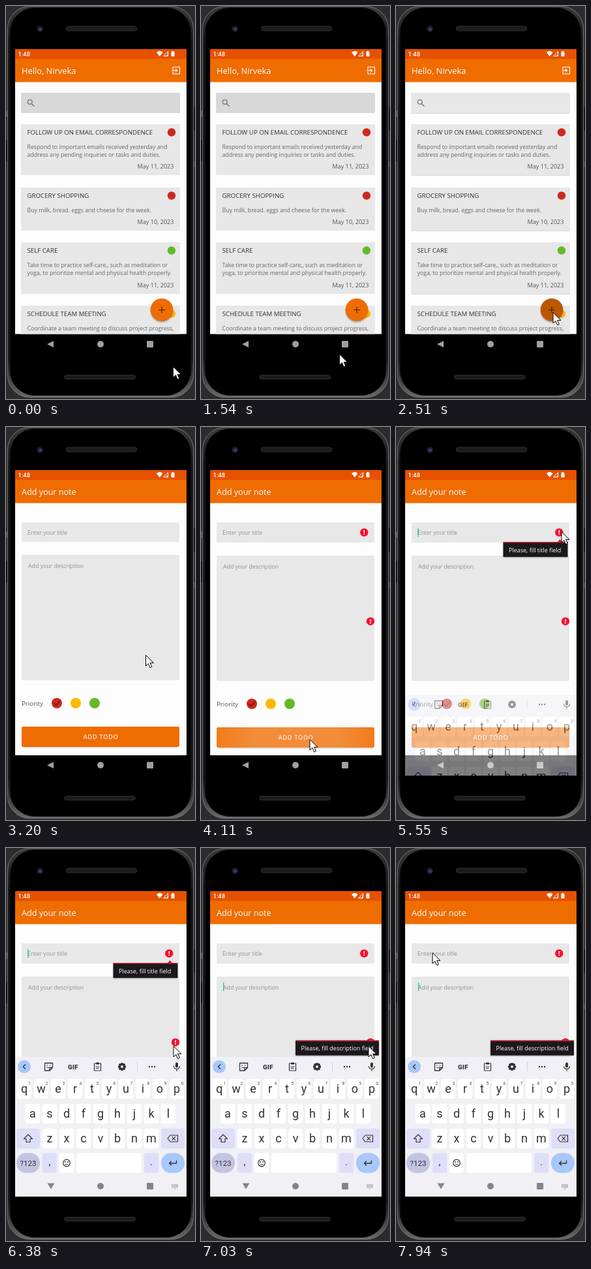
An HTML page for the animation above (8000 ms loop, 290 px wide and 602 px high).

```html
<!DOCTYPE html>
<html lang="en">
<head>
<meta charset="utf-8">
<title>Notes app demo</title>
<style>
html, body { margin: 0; width: 100%; height: 100%; overflow: hidden; background: #2c2c2c; }
svg { display: block; width: 290px; height: 602px; font-family: "Open Sans", "Noto Sans", sans-serif; }
.keys, .clock { font-family: Roboto, sans-serif; }
.line { fill: none; stroke-linecap: round; stroke-linejoin: round; }
</style>
</head>
<body>
<svg id="stage" viewBox="0 0 290 602"></svg>
<script>
const LOOP = 8000;
const RED = '#cf281d', YELLOW = '#ffb800', GREEN = '#65b82a', ORANGE = '#ef6c00';

const rect = (x, y, w, h, fill, r = 0, extra = '') =>
  `<rect x="${x}" y="${y}" width="${w}" height="${h}" rx="${r}" fill="${fill}" ${extra}/>`;
const dot = (x, y, r, fill, extra = '') => `<circle cx="${x}" cy="${y}" r="${r}" fill="${fill}" ${extra}/>`;
const text = (x, y, size, fill, s, extra = '') =>
  `<text x="${x}" y="${y}" font-size="${size}" fill="${fill}" ${extra}>${s}</text>`;
const line = (d, color, width = 1, extra = '') =>
  `<path class="line" d="${d}" stroke="${color}" stroke-width="${width}" ${extra}/>`;
const shape = (d, fill, extra = '') => `<path d="${d}" fill="${fill}" ${extra}/>`;
const group = (id, body, extra = '') => `<g id="${id}" ${extra}>${body}</g>`;
const MID = 'text-anchor="middle"', END = 'text-anchor="end"', MEDIUM = 'font-weight="500"';

function phone() {
  return rect(0, 0, 290, 602, '#2c2c2c')
    + rect(0, 160, 4, 10, '#555', 1) + rect(0, 205, 4, 33, '#111', 1)
    + rect(286, 155, 4, 36, '#111', 1) + rect(286, 238, 4, 9, '#444', 1)
    + rect(2.5, .5, 285, 599, 'url(#metal)', 34, 'stroke="#757575"')
    + rect(6, 2.5, 278, 594, '#000', 38, 'stroke="#1c1c1c"')
    + rect(92.5, 31, 108, 7, '#1c1c1c', 3, 'stroke="#2e2e2e"')
    + rect(89.5, 565.5, 109, 6, '#1c1c1c', 3, 'stroke="#2e2e2e"')
    + dot(52, 35, 5, '#1a1b22') + dot(52.5, 35.5, 2.5, '#323f72')
    + shape('M63 518l10-5v10z', '#a0a0a0') + dot(145, 518, 5, '#a0a0a0') + rect(216, 513, 10, 10, '#a0a0a0', 1);
}

function bars(title, size) {
  return rect(14, 66, 263, 437, '#fdfdfd') + rect(14, 81, 263, 35.6, ORANGE) + rect(14, 66, 263, 15, '#e65100')
    + text(18.5, 77, 9.4, '#fff', '1:48', 'class="clock" font-weight="500"')
    + shape('M231 71q4.8-4 9.6 0l-4.8 6.2z', '#fff')
    + line('M242 76.7h6.5v-6.5z', '#fff', 1) + shape('M245.5 77h3.5v-4z', '#fff')
    + rect(253.5, 69.7, 5, 7.5, '#fff', 1) + rect(255, 69, 2, 1, '#fff')
    + text(24, 104, size, '#fff', title, MEDIUM);
}

function card(y, h, title, body, date, color) {
  return rect(23, y + 1, 244, h, '#999', 1, 'class="shade"') + rect(23, y, 244, h, '#e7e7e7', 1)
    + text(32.5, y + 16, 9.7, '#303030', title, MEDIUM)
    + body.map((s, i) => text(32.5, y + 38 + 12 * i, 8.75, '#666', s)).join('')
    + text(257.5, y + h - 9.7, 9.1, '#555', date, END)
    + dot(254, y + 12.5, 6.2, color);
}

function listPage() {
  return bars('Hello, Nirveka', 12.9)
    + line('M256 97v-3.5h10.5v10.5h-10.5v-3.5M255 98.7h7.5M260.3 96.3l2.4 2.4-2.4 2.4', '#fff', 1.2)
    + rect(23, 134, 244, 31, '#999', 1, 'class="shade"') + rect(23, 133, 244, 31, '#d8d8d8', 1, 'id="search"')
    + dot(36.7, 147, 3.4, 'none', 'stroke="#757575" stroke-width="1.3"') + line('M39.3 149.7l3.7 3.6', '#757575', 1.5)
    + card(181, 78, 'FOLLOW UP ON EMAIL CORRESPONDENCE',
      ['Respond to important emails received yesterday and', 'address any pending inquiries or tasks and duties.'], 'May 11, 2023', RED)
    + card(278, 66, 'GROCERY SHOPPING', ['Buy milk, bread. eggs and cheese for the week.'], 'May 10, 2023', RED)
    + card(362, 79, 'SELF CARE',
      ['Take time to practice self-care,, such as meditation or', 'yoga, to prioritize mental and physical health properly.'], 'May 11, 2023', GREEN)
    + card(459, 79, 'SCHEDULE TEAM MEETING', ['Coordinate a team meeting to discuss project progress,'], '', YELLOW)
    + dot(239, 467.5, 17, '#000', 'opacity=".3" filter="url(#soft)"')
    + dot(239, 465.3, 17.4, ORANGE, 'id="fab"') + line('M234.5 465.5h9M239 461v9', '#3a1c00', 1.1);
}

const alertIcon = (x, y) => dot(x, y, 6.2, '#f8102f') + rect(x - .8, y - 3.5, 1.6, 4.3, '#fff', .5) + dot(x, y + 2.6, .95, '#fff');

function notePage() {
  const lower = rect(24, 196, 242, 192, '#e8e8e8', 2)
    + text(34, 216, 8.75, '#909090', 'Add your description')
    + text(24, 427, 9.75, '#555', 'Priority')
    + dot(78, 423, 8, RED) + dot(107, 423, 8, YELLOW) + dot(136, 423, 8, GREEN)
    + line('M73.7 423.5l3 3 6-6.5', '#5b1712', 1.4)
    + rect(26, 465, 238, 26, '#000', 2, 'opacity=".25" filter="url(#soft)"')
    + rect(24, 459, 242, 31, ORANGE, 2)
    + dot(145, 475, 1, 'url(#glow)', 'id="ripple" clip-path="url(#button)"')
    + text(145.5, 478.3, 9.5, '#fbe9dc', 'ADD TODO', MID + ' font-weight="600" letter-spacing=".5"');
  return bars('Add your note', 12.6)
    + rect(24, 146, 242, 30, '#e8e8e8', 2, 'id="titleBox"')
    + text(33, 164.5, 8.8, '#909090', 'Enter your title')
    + group('lower', lower)
    + group('alerts', alertIcon(250.3, 161.5) + alertIcon(260, 297.7))
    + rect(33.3, 155, 1.3, 13, '#1fbfae', 0, 'id="caret"');
}

const tip = (id, x, y, w, s, arrow) => group(id,
  rect(x, y + 1, w, 23, '#000', 1, 'opacity=".3" filter="url(#soft)"')
  + shape(arrow, '#e4132f') + rect(x, y, w, 23, '#1b191b') + rect(x, y, w, 1.5, '#c81832')
  + text(x + 8.5, y + 15.5, 9, '#fff', s));

function keyboard() {
  const ink = '#303136', lilac = '#dedef8', blue = '#a8c7fa';
  const key = (x, y, w, fill = '#fff', r = 4) => rect(x - w / 2, y - 15.3, w, 30.6, fill, r);
  const letters = (s, x0, y) => [...s].map((c, i) =>
    key(x0 + 26 * i, y, 22.5) + text(x0 + 26 * i, y + 5.5, 18, ink, c, MID)).join('');
  const digits = [...'1234567890'].map((c, i) => text(36.5 + 26 * i, 362.5, 6.8, '#55565c', c, MID)).join('');
  const gear = Array.from({ length: 8 }, (_, i) =>
    rect(176.6, 329, 2.8, 12, ink, .5, `transform="rotate(${i * 45} 178 335)"`)).join('');
  return rect(14, 320, 263, 310, '#f0f0f5')
    + dot(28, 335, 10, blue) + line('M29.5 331.8l-3.2 3.2 3.2 3.2', ink, 1.3)
    + line('M59.5 329.5h12v7l-4.5 4.5h-7.5zM71.5 336.5h-4.5v4.5', ink, 1.3)
    + dot(63, 333, .8, ink) + dot(67.5, 333, .8, ink) + line('M62.5 336q2.5 2 4 0', ink)
    + text(103, 338.7, 9.8, ink, 'GIF', MID + ' font-weight="900" letter-spacing=".4"')
    + line('M135.5 330h10v11h-10zM138 337.5h4M138 335h5', ink, 1.2) + rect(138, 328.5, 5, 3, ink, 1)
    + gear + dot(178, 335, 4.7, ink) + dot(178, 335, 2, '#f0f0f5')
    + rect(201, 328, 1, 14, '#d2d2d8')
    + [220, 224, 228].map(x => dot(x, 335, 1.2, ink)).join('')
    + rect(260, 328.5, 4, 8, ink, 2) + line('M257.5 334.5q.5 4 4.5 4t4.5-4M262 339v2.5', ink, 1.2)
    + letters('qwertyuiop', 28, 369) + digits + letters('asdfghjkl', 41, 407) + letters('zxcvbnm', 67, 445)
    + key(34, 445, 36, lilac) + line('M34 439l-6.5 6.5h3.5v5h6v-5h3.5z', ink, 1.2)
    + key(256, 445, 36, lilac) + line('M248 445l4-5h11.5v10h-11.5zM255 442.7l4.6 4.6M259.6 442.7l-4.6 4.6', ink, 1.2)
    + key(34, 482.5, 36, '#c3c3e3', 15) + text(34, 486.7, 11.5, ink, '?123', MID)
    + key(67, 482.5, 22.5, lilac) + text(67, 486, 15, ink, ',', MID)
    + key(93, 482.5, 22.5) + dot(93, 482.5, 5.3, 'none', `stroke="${ink}" stroke-width="1.2"`)
    + dot(91, 481, .9, ink) + dot(95, 481, .9, ink) + line('M90.5 484.2q2.5 2.4 5 0', ink)
    + key(158, 482.5, 100) + key(223, 482.5, 22.5, lilac) + text(223, 486, 15, ink, '.', MID)
    + key(256, 482.5, 36, blue, 15) + line('M261.5 479v4h-11M253.5 480l-3 3 3 3', ink, 1.3)
    + shape('M63.5 513.5h11l-5.5 9z', '#858589') + dot(145, 518, 5, '#858589') + rect(216, 513, 10, 10, '#858589', 1)
    + rect(254, 515, 10, 5.5, '#bbbbc0', 1) + shape('M257 521.5h4l-2 2z', '#bbbbc0')
    + line('M255.5 516.8h7M255.5 518.6h7', '#f0f0f5', .6, 'stroke-dasharray=".6 1.2"');
}

const $ = id => document.getElementById(id);
$('stage').innerHTML = `<defs>
  <clipPath id="page"><rect x="14" y="66" width="263" height="436.6"/></clipPath>
  <clipPath id="screen"><rect x="14" y="66" width="263" height="468"/></clipPath>
  <clipPath id="button"><rect x="24" y="459" width="242" height="31" rx="2"/></clipPath>
  <linearGradient id="metal" x2="0" y2="1">
    <stop stop-color="#3c3c3c"/><stop offset=".1" stop-color="#141414"/>
    <stop offset=".9" stop-color="#141414"/><stop offset="1" stop-color="#6a6a6a"/></linearGradient>
  <radialGradient id="glow">
    <stop offset=".5" stop-color="#fff"/><stop offset="1" stop-color="#fff" stop-opacity=".4"/></radialGradient>
  <filter id="soft" x="-30%" y="-30%" width="160%" height="160%"><feGaussianBlur stdDeviation="1.2"/></filter></defs>`
  + phone()
  + `<g clip-path="url(#page)">${group('list', listPage())}${group('note', notePage())}</g>`
  + tip('titleTip', 164.5, 176, 99, 'Please, fill title field', 'M247.5 176.5l4-4.5 4 4.5z')
  + tip('bodyTip', 145, 294.7, 128, 'Please, fill description field', '')
  + `<g clip-path="url(#screen)">${group('keyboard', keyboard(), 'class="keys"')}</g>`
  + shape('M.5 .5v16.5l3.9-3.6 2.7 6.3 2.8-1.2-2.7-6.1h5.3z', '#fff', 'id="cursor" stroke="#000"');

// Each track lists [time, ...values]; a value holds until the next time.
const tracks = {
  cursor: [[0, 256, 552], [1150, 250, 563], [1270, 240, 571], [1420, 224, 555], [1540, 212, 533], [1660, 211, 503],
    [1790, 240, 472], [1940, 240.5, 469], [3200, 214, 349], [3350, 179, 435], [3500, 169, 468], [3620, 166.5, 478],
    [4470, -50, 0], [4770, 252, 156], [4890, 253.5, 160], [5830, 259, 195], [5980, 259, 266], [6130, 258, 290],
    [6260, 256.5, 303], [7150, 220, 262], [7270, 155, 205], [7390, 99, 168], [7540, 55.5, 160]],
  fab: [[0, ORANGE], [2390, '#d86200'], [2510, '#bd5600']],
  note: [[0, 0, 0], [2660, .4, 24], [2780, .85, 6], [2900, 1, 0]],
  ripple: [[0, 0, 0], [3740, 35, .22], [3870, 80, .22], [3990, 130, .22], [4350, 130, .1], [4470, 0, 0]],
  keyboard: [[0, 0, 90], [5550, .5, 90], [5680, .95, 12], [5830, 1, 0]],
  caret: [[0, 0, 0], [5430, 1, 0], [5830, 0, 0], [6380, 1, 0], [6770, 0, 0], [6910, 1, 51], [7390, 0, 51], [7940, 1, 51]]
};
const at = (name, t) => tracks[name].filter(k => k[0] <= t).pop().slice(1);
const set = (id, attrs) => { for (const a in attrs) $(id).setAttribute(a, attrs[a]); };
const move = (x, y) => `translate(${x} ${y})`;
const shades = document.querySelectorAll('.shade');

function draw(t) {
  const pressed = t >= 2250, invalid = t >= 3870;
  set('cursor', { transform: move(...at('cursor', t)) });
  set('fab', { fill: at('fab', t)[0] });
  set('search', { fill: pressed ? '#e7e7e7' : '#d8d8d8' });
  shades.forEach(s => s.setAttribute('opacity', pressed ? .35 : 0));
  for (const id of ['note', 'keyboard']) {
    const [opacity, y] = at(id, t);
    set(id, { opacity, transform: move(0, y) });
  }
  const [r, opacity] = at('ripple', t);
  set('ripple', { r, opacity });
  set('titleBox', { height: invalid ? 31 : 30 });
  set('lower', { transform: move(0, invalid ? 1 : 0) });
  set('alerts', { opacity: +invalid });
  const [shown, y] = at('caret', t);
  set('caret', { opacity: shown, transform: move(y ? .7 : 0, y) });
  set('titleTip', { opacity: +(t >= 5430 && t < 6910) });
  set('bodyTip', { opacity: +(t >= 7030) });
}

const start = performance.now();
function frame() {
  draw((performance.now() - start) % LOOP);
  requestAnimationFrame(frame);
}
frame();
</script>
</body>
</html>
```
